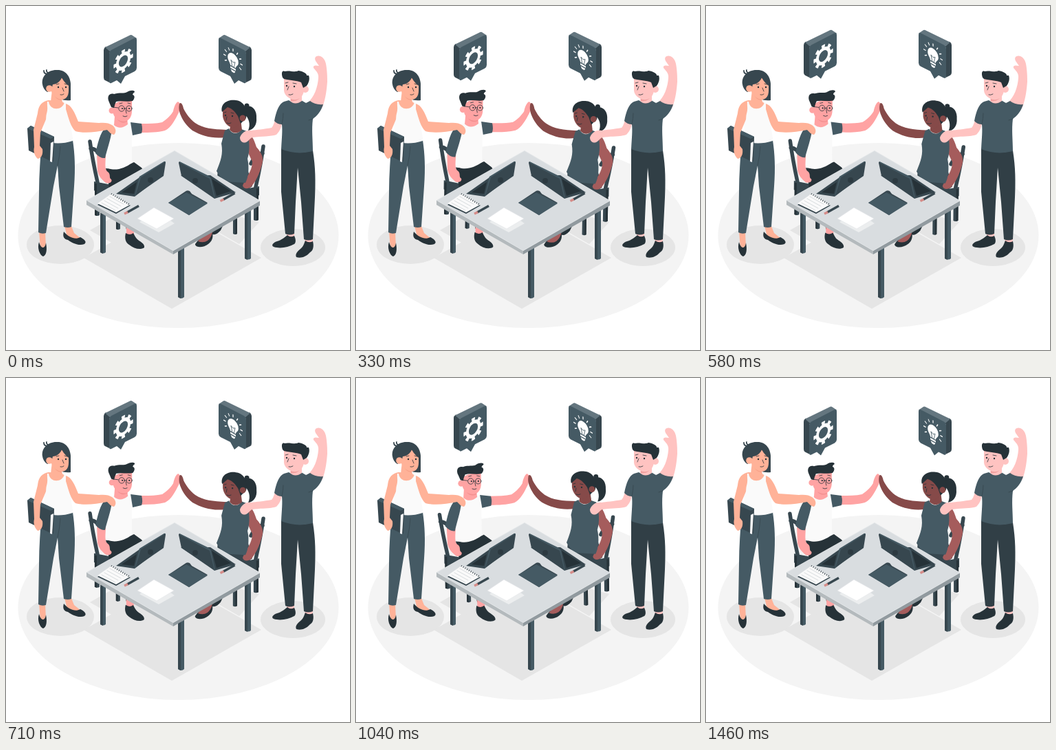
These frames come from a looping animation (500 px wide and 500 px high, 1500 ms). An HTML page:

```html
<!DOCTYPE html>
<html lang="en">
<head>
<meta charset="utf-8">
<title>Team high five</title>
<style>
  html, body { margin: 0; width: 100%; height: 100%; overflow: hidden; background: #fff; }
  svg { display: block; width: 100vw; height: 100vh; }
  .ink { fill: #263238; }
  .dark { fill: #37474f; }
  .slate { fill: #455a64; }
  .white { fill: #fafafa; }
  .peach { fill: #ffb298; }
  .pink { fill: #ffa3a3; }
  .rose { fill: #ffc3c1; }
  .brown { fill: #864a49; }
  .line { fill: none; stroke: #263238; stroke-width: .8; stroke-linecap: round; }
</style>
</head>
<body>
<svg viewBox="0 0 500 500">
  <defs>
    <g id="bubble">
      <path class="dark" d="M142 64 Q142 61 145 59 L153 65 Q150 67 150 70 V109 Q150 112 152 112 L144 108 Q142 107 142 104Z"/>
      <path fill="#64767f" d="M144 60 L179 43 Q182 41 184 43 L190 47 L152 67Z"/>
      <path class="slate" d="M150 69 Q150 66 153 64 L186 47 Q190 45 190 49 V90 Q190 93 187 95 L173 102 L167 113 L161 108 L153 112 Q150 113 150 109Z"/>
    </g>
    <g id="chair">
      <path class="line" d="M122 197 Q126 225 133 256 M123 207 Q132 207 140 222" style="stroke:#37474f;stroke-width:5.500"/>
      <path class="dark" d="M128 255 L164 262 L178 276 L160 290 L128 268Z M129 258 h7 v46 q-3 2 -7 0Z M160 270 h6 v54 q-3 2 -6 0Z"/>
      <path class="ink" d="M129 258 h3 v47 l-3 -1Z M160 270 h2.500 v55 l-2.500 -1Z"/>
    </g>
  </defs>

  <!-- floor -->
  <ellipse cx="250.500" cy="333.500" rx="233" ry="134.500" fill="#f4f4f4"/>
  <g fill="#e5e5e5">
    <path d="M243 293 L371 366 L241 440 L113 366Z"/>
    <path d="M122 326 L157 306 L192 326 L157 346Z"/>
    <path d="M304 326 L339 306 L368 314 L339 346Z"/>
    <ellipse cx="79" cy="347" rx="49" ry="28"/>
    <ellipse cx="417" cy="351" rx="47" ry="27"/>
  </g>

  <g id="seated">
    <use href="#chair"/>
    <use href="#chair" transform="matrix(-1 0 0 1 496 7)"/>

    <!-- seated man -->
    <path class="ink" d="M145 236 C160 238 175 232 186 227 L197 235 L208 250 V280 L187 318 V325 H175 L165 270 L150 264Z"/>
    <path class="pink" d="M175 320 H186 V333 Q180 337 175 333Z"/>
    <path class="ink" d="M174 330 C172 338 174 344 179 347 C186 353 196 355 201 351 C202 346 196 343 192 340 C188 337 187 333 185 330 Q180 334 174 330Z"/>
    <path class="pink" d="M196 171 C208 171 218 171 227 169 C235 164 240 158 243 153 C244 147 247 140 250 139 C254 141 254 148 251 155 C246 165 240 177 231 181 C220 184 208 184 196 184Z"/>
    <path class="white" d="M145 176 L160 170 L178 170 L186 170 L183 190 V228 C170 238 152 242 142 231Z"/>
    <path class="slate" d="M181 169 L197 171 Q199 179 197 185 L184 188Z"/>
    <path class="pink" d="M132 213 L133 240 C135 248 139 252 145 257 C151 259 155 255 153 252 C149 250 153 245 148 241 C144 238 144 234 145 218Z"/>
    <path class="slate" d="M148 175 C139 179 135 192 130 214 Q137 222 144 221 C147 208 152 195 154 180Z"/>
    <path class="pink" d="M158 160 L157 173 Q166 181 177 172 L176 162Z"/>
    <path fill="#f28f8f" d="M162 165 Q168 172 176 168 V166Z"/>
    <circle class="pink" cx="154" cy="152" r="4.500"/>
    <path class="pink" d="M156 146 C160 136 175 138 183 137 L183 152 C183 161 179 167 172 168 C164 168 158 163 156 157Z"/>
    <path class="ink" d="M150 140 C146 132 150 126 157 128 C165 125 172 128 176 125 C181 122 187 122 187 125 Q184 127 184 129 C188 130 187 135 184 138 C176 140 168 137 160 139 Q158 143 157 148 L153 147Z"/>
    <path class="line" d="M172 149 h3 M163 148 L155 147 M165 142 l4 -1 M177 141 l4 1 M170 160 q3 2 6 0 M174 151 l1 5"/>
    <g class="line"><circle cx="168" cy="149" r="4.200"/><circle cx="179" cy="149" r="4"/></g>
    <g class="ink"><circle cx="169" cy="149" r="1.100"/><circle cx="179" cy="149" r="1.100"/></g>

    <!-- seated woman -->
    <path class="ink" d="M310 255 L345 258 L312 326 Q304 335 299 331 L293 260Z"/>
    <path class="dark" d="M308 238 L352 240 L358 262 L340 275 L306 260Z"/>
    <path class="ink" d="M275 346 C278 341 283 337 288 332 L300 329 C302 338 298 343 294 346 C288 351 277 352 275 347Z"/>
    <path fill="#a55c5c" d="M279 342 Q286 333 290 330 L300 329 Q298 337 293 341 Q287 345 279 342Z"/>
    <path class="brown" d="M252 142 C254 139 257 143 258 149 C262 157 267 164 275 170 C287 178 300 179 321 180 L318 191 C300 193 285 189 271 181 C262 174 257 166 254 159 C251 152 251 147 252 142Z"/>
    <path fill="#a55c5c" d="M347 183 C356 185 360 192 364 205 C370 212 374 218 373 226 C370 240 365 252 357 262 C352 267 345 266 344 261 C346 255 350 253 351 247 C356 240 358 232 358 226 C353 216 348 205 346 195Z"/>
    <path class="slate" d="M318 181 L324 178 C328 187 338 187 342 179 L350 182 C354 195 355 210 351 222 C354 235 352 250 348 257 L316 255 L306 240 C312 225 316 215 313 200Z"/>
    <path class="brown" d="M327 170 L325 180 Q333 189 343 180 L341 164Z"/>
    <path class="ink" d="M346 147 C357 142 365 151 364 163 C365 172 360 180 352 181 C356 172 353 162 346 157Z"/>
    <path class="brown" d="M315 152 C318 142 328 142 335 147 L342 158 C341 170 338 176 330 177 C322 176 316 168 315 160Z"/>
    <path class="ink" d="M314 154 C311 142 322 135 334 137 C345 138 352 149 349 163 L341 171 L337 160 C333 154 329 149 322 147Z"/>
    <circle class="ink" cx="350" cy="145" r="3.500"/>
    <circle class="brown" cx="344" cy="163" r="4.500"/>
    <path class="line" d="M317 155 l3 -1 M327 155 l4 1 M321 161 l-1 5 M321 170 q3 2 6 0"/>
    <g class="ink"><circle cx="319" cy="159" r="1.200"/><circle cx="329" cy="160" r="1.200"/></g>
  </g>

  <!-- table -->
  <path class="slate" d="M137 290 h8 v68 q-4 3 -8 0Z M347 290 h9 v77 q-4 3 -9 0Z M250 350 h9 v73 q-4 4 -9 0Z"/>
  <path class="dark" d="M137 290 h4 v70 l-4 -2Z M347 290 h4 v79 l-4 -2Z M250 350 h4 v75 l-4 -2Z"/>
  <path fill="#b4babd" d="M117 282 L243 355 V361 L117 289Z"/>
  <path fill="#919a9f" d="M369 283 L243 355 V361 L369 290Z"/>
  <path fill="#d9dde0" stroke="#e3e6e8" d="M245 210.500 L369 283 L243 355.500 L117.500 282.500Z"/>

  <!-- laptops -->
  <path class="dark" d="M160 273 L197 247 L229 245 L187 277Z"/>
  <path class="ink" d="M168 271 L190 256 L186 273Z"/>
  <path class="dark" d="M194 248 L230 226 Q232 225 232 228 L229 247 L187 276Z"/>
  <path class="slate" d="M194 248 L230 226 L232 226 L196 249 L188 276 L187 276Z"/>
  <circle class="ink" cx="210" cy="253" r="4" opacity=".6"/>
  <path class="dark" d="M254 246 L297 246 L334 271 L303 280Z"/>
  <path class="ink" d="M299 251 L327 269 L306 276Z"/>
  <path class="dark" d="M251 228 Q251 225 254 227 L293 247 Q296 248 297 251 L303 279 L255 247Z"/>
  <path class="slate" d="M252 226 L293 246 Q297 248 298 251 L304 280 L303 280 L296 251 L253 228Z"/>
  <circle class="ink" cx="275" cy="254" r="4" opacity=".6"/>

  <!-- stationery -->
  <path class="dark" d="M133 289 L153 274 L181 290 L160 302Z"/>
  <path class="white" d="M133 287 L153 273 L180 289 L160 300Z"/>
  <path class="line" d="M139 286 l20 11 M143 283 l20 11 M147 280 l20 11 M151 277 l20 11" style="stroke:#c0c7ca;stroke-width:.6"/>
  <path class="line" d="M153 273 L180 289" style="stroke-width:2.500;stroke-dasharray:.8 2.400;stroke-linecap:butt"/>
  <path fill="#eceeef" d="M194 314 L219 298 L245 316 L222 329Z"/>
  <path fill="#fff" stroke="#e2e5e7" stroke-width=".6" d="M191 309 L215 293 L244 309 L219 324Z"/>
  <path class="dark" d="M236 286 L260 270 Q263 267 267 269 L270 273 L293 286 L266 304Z"/>
  <path class="slate" d="M236 286 L262 271 L293 287 L266 304Z"/>
  <g id="pencil" stroke-width="3.500">
    <path stroke="#37474f" d="M176 300 L193 290.500"/>
    <path stroke="#d58c88" d="M172 302 L177 299.500"/>
  </g>
  <use href="#pencil" x="139.500" y="-18.500"/>

  <!-- standing woman -->
  <path class="peach" d="M48 328 H57 L58 350 L50 352Z M85 320 H95 L99 330 L109 338 L90 339Z"/>
  <path class="ink" d="M48 343 C45 352 49 362 54 364 C59 362 60 354 58 344 C57 353 51 354 48 343Z M84 328 C82 335 84 339 90 340 C97 345 106 349 114 346 C118 343 114 339 108 336 C101 340 92 337 84 328Z"/>
  <path class="slate" d="M52 195 Q75 203 97 195 C100 215 101 235 99 262 L95 321 Q90 323 84 321 L77 262 L75 232 L69 262 L58 330 Q52 332 47 329 L48 270 C48 245 50 220 52 195Z"/>
  <path class="line" d="M75 232 Q78 218 79 204" style="stroke:#37474f"/>
  <path class="peach" d="M62 137 C52 138 48 146 47 156 L56 172 L90 160 L97 168 L92 146 L80 138Z"/>
  <path class="white" d="M59 139 L62 139 C64 153 82 152 85 140 L88 142 C96 152 97 162 95 172 C94 183 98 190 97 196 Q75 203 55 196 C58 185 54 174 55 164 C61 156 61 148 59 139Z"/>
  <path class="peach" d="M87 142 C95 144 100 155 105 168 L135 170 C143 169 150 170 154 173 C160 177 161 183 157 187 C153 187 150 183 147 180 C130 184 110 185 101 182 C94 176 91 163 87 150Z"/>
  <path class="dark" d="M31 178 L36 174 L70 190 L69 226 L64 225 L33 210Z"/>
  <path class="slate" d="M31 178 L36 174 L70 190 L65 193Z"/>
  <path class="white" d="M65 199 L69 197 L67 227 L64 226Z"/>
  <path class="peach" d="M60 139 C50 139 47 147 46 156 L40 180 L41 205 C39 213 43 219 46 222 C52 221 54 215 53 208 L49 203 L50 184 L58 165Z"/>
  <path class="dark" d="M80 98 Q94 104 94 117 V137 Q86 138 78 135Z"/>
  <path class="peach" d="M67 122 L65 139 Q74 149 82 139 L80 132Z"/>
  <path fill="#f59f86" d="M70 130 Q74 137 81 137 V134Z"/>
  <path class="peach" d="M65 113 L80 104 L91 112 V123 C91 131 87 136 81 136 C73 135 68 130 65 122Z"/>
  <path class="dark" d="M53 114 C51 101 62 92 75 93 C87 93 95 103 94 118 C88 114 84 110 81 104 C79 110 73 114 68 114 L66 122 L60 125 Q54 121 53 114Z"/>
  <path class="line" d="M61 99 Q55 99 55 94 M62 97 Q58 96 59 93" style="stroke:#37474f;stroke-width:1.800"/>
  <circle class="peach" cx="63" cy="120" r="4.800"/>
  <path class="line" d="M73 114 l4 -1 M85 113 l4 1 M82 119 l2 5 M79 129 q3 1 5 -1"/>
  <g class="ink"><circle cx="76" cy="118" r="1.200"/><circle cx="87" cy="118" r="1.200"/></g>

  <!-- standing man -->
  <path class="rose" d="M408 328 H419 V339 H408Z M435 336 H446 V347 H434Z"/>
  <path class="ink" d="M409 333 Q413 337 419 334 C422 340 421 345 419 346 C410 351 398 353 389 350 C385 348 388 344 394 342 C401 340 405 336 409 333Z M435 341 Q440 345 446 342 C448 350 446 356 442 358 C436 365 428 367 422 365 C420 361 423 357 428 353 C432 350 433 346 435 341Z"/>
  <path fill="#313f46" d="M400 206 Q422 217 446 210 C450 235 450 255 449 278 L446 339 Q439 342 433 339 L429 285 L424 235 L421 285 L419 331 Q412 334 406 331 L400 270Z"/>
  <path class="rose" d="M438 141 C448 133 453 118 454 105 C455 98 451 95 447 90 C446 86 450 86 455 87 C452 82 447 78 450 74 C455 70 463 74 465 84 C467 95 467 105 467 110 C466 122 465 133 460 147 L446 152Z"/>
  <path class="rose" d="M391 166 C389 172 388 175 386 177 C375 179 363 180 357 181 C350 180 343 183 340 191 C340 197 345 200 349 198 C352 197 354 193 358 191 C372 189 385 190 393 187 C398 182 400 177 401 170Z"/>
  <path class="slate" d="M404 139 L411 137 Q420 144 429 137 L436 141 L442 138 Q449 144 461 143 C458 153 452 160 446 164 C444 180 446 195 446 211 Q422 217 400 208 C401 190 402 182 401 172 Q394 172 390 167 C393 152 397 142 404 139Z"/>
  <path class="line" d="M401 172 Q403 163 403 156 M446 164 L440 166" style="stroke:#37474f"/>
  <path class="rose" d="M414 128 L413 138 Q420 145 430 138 V122Z"/>
  <path fill="#f0a09f" d="M414 134 Q422 139 429 130 Q425 140 414 138Z"/>
  <circle class="rose" cx="435" cy="121" r="5"/>
  <path class="rose" d="M404 106 C412 102 424 104 433 109 L433 124 C431 133 425 137 417 136 C409 134 404 128 404 122Z"/>
  <path class="ink" d="M402 104 C400 98 401 93 405 95 C412 93 420 97 425 94 C433 95 438 99 437 101 L440 101 C442 106 440 112 437 116 L432 119 L429 111 C422 108 412 108 404 106Z"/>
  <path class="line" d="M406 112 l4 -1 M417 112 l5 1 M411 117 l-2 5 M411 129 q3 1 6 -1"/>
  <g class="ink"><circle cx="408" cy="116" r="1.200"/><circle cx="419" cy="117" r="1.200"/></g>

  <!-- speech bubbles -->
  <g id="bubbles">
    <use href="#bubble"/>
    <use href="#bubble" transform="matrix(-1 0 0 1 499 0)"/>
    <g transform="matrix(.87 -.5 0 1 170.500 80)" fill="none" stroke="#fff">
      <circle r="10" stroke-width="4.800"/>
      <circle r="14" stroke-width="4.500" pathLength="16" stroke-dasharray="1 1" stroke-dashoffset=".5"/>
    </g>
    <g transform="matrix(.87 .5 0 1 330 79)">
      <path fill="#fff" d="M-4.500 9 C-5 5 -9 4 -9 -1 A9 9 0 0 1 9 -1 C9 4 5 5 4.500 9Z M-4.500 10.500 h9 v2.500 h-9Z M-4 14.500 h8 l-2 3 h-4Z"/>
      <path class="line" d="M-1.500 9 L-3.500 1 L0 3 L3.500 1 L1.500 9" style="stroke:#455a64"/>
      <g id="rays" stroke="#fff" stroke-width="1.400" stroke-linecap="round"></g>
    </g>
  </g>
</svg>
<script>
  const LOOP = 1500, LIFT = 9.5, SWAY = 1;
  const get = id => document.getElementById(id);
  const triangle = p => 1 - Math.abs(1 - 2 * (p % 1));   // 0 -> 1 -> 0

  for (let angle = -120; angle <= 120; angle += 30)
    get('rays').innerHTML += `<path d="M0 -12.500V-15.500" transform="translate(0 -1) rotate(${angle})"/>`;

  function draw(now) {
    const p = now % LOOP / LOOP;
    const tilt = SWAY * (2 * triangle(p + .25) - 1);
    get('bubbles').setAttribute('transform', `translate(0 ${-LIFT * triangle(p)})`);
    get('seated').setAttribute('transform', `rotate(${tilt} 247 238)`);
    requestAnimationFrame(draw);
  }
  draw(performance.now());
</script>
</body>
</html>
```
